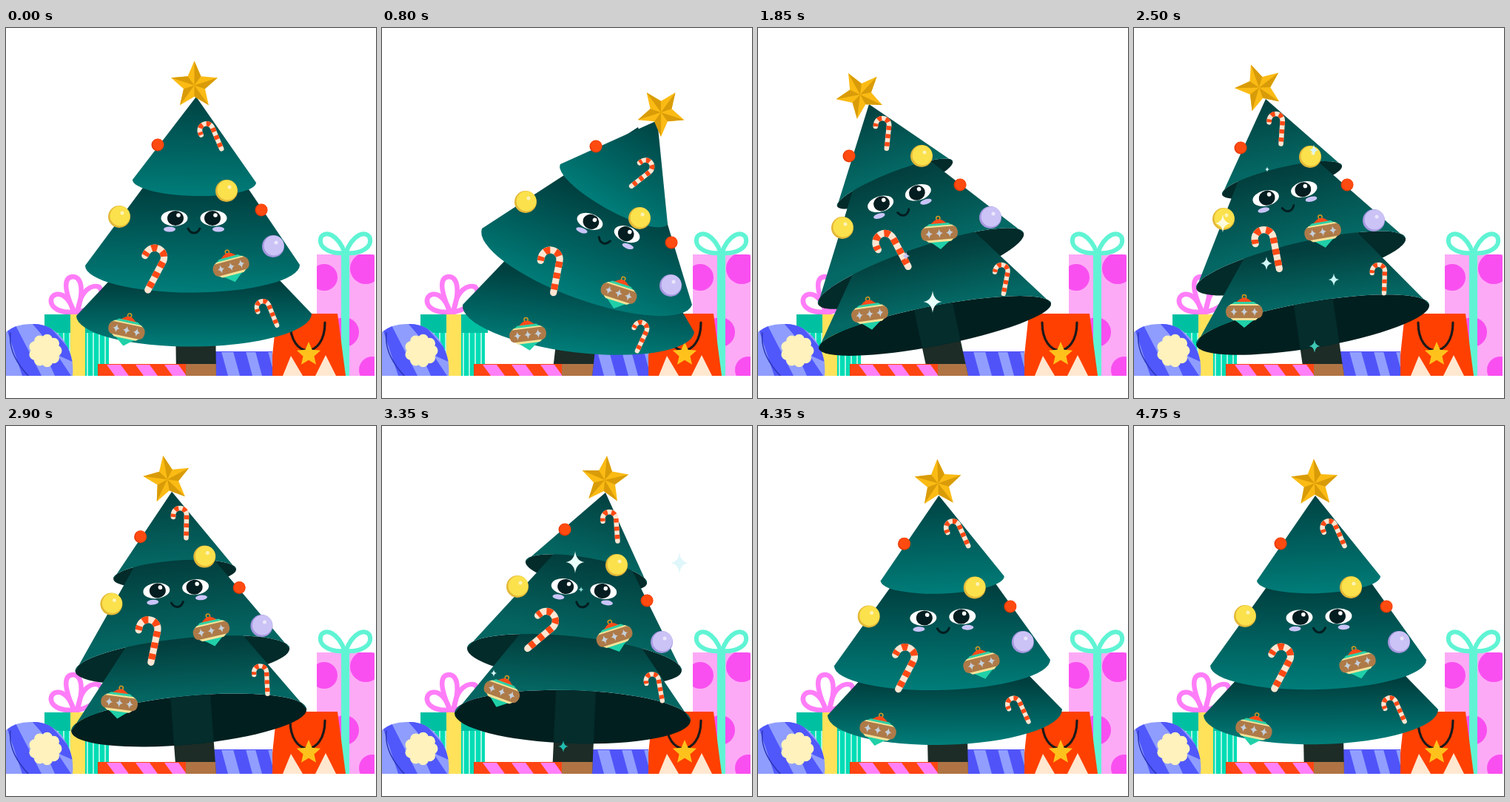
These frames come from a looping animation (500x500 px, 4.8 s). An HTML page with a canvas:

```html
<!DOCTYPE html>
<html lang="en">
<head>
<meta charset="utf-8">
<title>Swaying tree</title>
<style>
html, body { margin: 0; width: 100%; height: 100%; overflow: hidden; background: #fff; }
canvas { display: block; width: 500px; height: 500px; }
</style>
</head>
<body>
<canvas id="stage" width="500" height="500"></canvas>
<script>
const ctx = document.getElementById('stage').getContext('2d');
const LOOP = 4800, TAU = Math.PI * 2, RAD = Math.PI / 180;
const PIVOT = { x: 256, y: 455 };

// Each knot: time, pose a, pose b, mix from a to b.
const KNOTS = [
  [0, 0, 0, 0], [550, 0, 1, 1.04], [800, 1, 1, 0], [950, 1, 2, .37],
  [1050, 1, 2, .66], [1150, 1, 2, .9], [1400, 1, 2, 1.05], [1850, 2, 2, 0],
  [2200, 2, 3, .2], [2500, 3, 3, 0], [2750, 3, 4, .01], [3150, 3, 4, 1.05],
  [3350, 4, 4, 0], [3950, 5, 5, 0], [4430, 5, 6, 1.12], [4750, 6, 6, 0]
].map(([t, a, b, k]) => {
  const w = Array(7).fill(0);
  w[a] += 1 - k;
  w[b] += k;
  return { t, w };
});

function knot(i) {
  const n = KNOTS.length, turn = Math.floor(i / n), k = KNOTS[i - turn * n];
  return { t: k.t + turn * LOOP, w: k.w };
}

// Smooth blend weights of the seven poses.
function weightsAt(t) {
  let i = KNOTS.length - 1;
  while (KNOTS[i].t > t) i--;
  const [a, b, c, d] = [i - 1, i, i + 1, i + 2].map(knot);
  const h0 = b.t - a.t, h1 = c.t - b.t, h2 = d.t - c.t;
  const s = (t - b.t) / h1, s2 = s * s, s3 = s2 * s;
  return b.w.map((v, j) => {
    const d0 = (v - a.w[j]) / h0, d1 = (c.w[j] - v) / h1, d2 = (d.w[j] - c.w[j]) / h2;
    const m0 = (d0 * h1 + d1 * h0) / (h0 + h1), m1 = (d1 * h2 + d2 * h1) / (h1 + h2);
    return v * (2 * s3 - 3 * s2 + 1) + c.w[j] * (3 * s2 - 2 * s3)
      + h1 * (m0 * (s3 - 2 * s2 + s) + m1 * (s3 - s2));
  });
}

// Points blend as angle and radius round the foot of the tree; the rest are plain values.
function track(rows, points = 1) {
  const keys = rows.map(row => {
    const r = row.slice();
    for (let i = 0; i < points * 2; i += 2) {
      const dx = row[i] - PIVOT.x, dy = PIVOT.y - row[i + 1];
      r[i] = Math.atan2(dx, dy);
      r[i + 1] = Math.hypot(dx, dy);
    }
    return r;
  });
  return w => {
    const v = keys[0].map((_, c) => keys.reduce((sum, k, i) => sum + w[i] * k[c], 0));
    for (let i = 0; i < points * 2; i += 2) {
      const [a, r] = [v[i], v[i + 1]];
      v[i] = PIVOT.x + r * Math.sin(a);
      v[i + 1] = PIVOT.y - r * Math.cos(a);
    }
    return v;
  };
}

// Cone tiers: apex, left corner, right corner, signed rim depth.
const topTier = track([
  [257, 93, 171, 205, 338, 209, 20], [372, 125, 241, 184, 386, 265, 22],
  [150, 103, 107, 241, 263, 180, -16], [178, 96, 119, 225, 281, 186, -17],
  [302, 90, 194, 183, 358, 213, -20], [284, 88, 185, 181, 349, 208, -19],
  [245, 94, 166, 209, 333, 203, 20]], 3);
const midTier = track([
  [259, 116, 107, 321, 397, 320, 37], [346, 134, 135, 271, 419, 374, 45],
  [158, 122, 81, 373, 359, 277, -28], [176, 117, 84, 352, 367, 284, -28],
  [294, 106, 115, 300, 405, 331, -31], [279, 105, 110, 302, 401, 326, -31],
  [252, 116, 103, 324, 395, 316, 36]], 3);
const lowTier = track([
  [254, 220, 95, 389, 413, 386, 43], [290, 185, 109, 374, 422, 411, 46],
  [196, 185, 82, 433, 396, 372, -27], [216, 190, 84, 428, 399, 374, -31],
  [270, 180, 98, 388, 417, 398, -36], [264, 180, 97, 391, 415, 398, -37],
  [252, 220, 94, 391, 411, 383, 43]], 3);

const starTrack = track([[254.5, 77.5, 0], [377, 114, 36], [138, 90, -29], [169, 80.5, -19.5],
  [301, 73, 5], [285, 71, 11], [244, 77.5, -2]]);
// Last value: drop of the mouth.
const faceTrack = track([[254, 257, 0, 15], [306, 270, 19, 17], [191, 230, -17, 19],
  [204, 224, -13, 19], [273, 220, 7, 20], [264, 219.5, 5, 20], [250, 258, -2, 16]]);

const balls = [
  { r: 8.5, fill: '#ff4a10', shade: '#e53a06',
    at: track([[205, 158], [289, 160], [123, 173], [144, 162], [247, 140], [229, 137], [198, 159]]) },
  { r: 8.5, fill: '#ff4a10', shade: '#e53a06',
    at: track([[345, 246], [391, 290], [273, 212], [288, 212], [358, 236], [345, 237], [341, 244]]) },
  { r: 15, fill: '#fbe14c', shade: '#e3b838',
    at: track([[298, 220], [348, 257], [221, 173], [238, 174], [317, 188], [317, 182], [293, 218]]) },
  { r: 15, fill: '#fbe14c', shade: '#e3b838',
    at: track([[153, 255], [194, 235], [114, 270], [121, 258], [183, 217], [178, 230], [150, 257]]) },
  { r: 15, fill: '#cbc3f6', shade: '#a597df',
    at: track([[361, 295], [390, 348], [314, 256], [324, 260], [378, 292], [368, 291], [358, 292]]) }
];
const canes = [
  { size: 1, at: track([[276, 148, -23], [348, 195, 52], [168, 142, 6], [192, 136, 4],
    [309, 136, -4], [284, 129, 32], [269, 147, -24]]) },
  { size: 1.4, at: track([[195, 324, 28], [226, 328, 11], [180, 303, -28], [180, 300, -11],
    [211, 274, 50], [219, 287, 14], [193, 325, 28]]) },
  { size: .95, at: track([[352, 387, -22], [346, 416, 25], [328, 339, 11], [331, 339, 2],
    [368, 354, -10], [355, 349, 27], [351, 385, -24]]) }
];
const baubles = [
  track([[304, 322, -15], [320, 358, 18], [245, 277, -5], [255, 275, -10],
    [314, 284, -18], [297, 286, 0], [302, 320, -14]]),
  track([[163, 408, 12], [197, 414, -7], [151, 386, -8], [149, 383, 0],
    [162, 359, 20], [166, 363, -2], [162, 410, 12]])
];
// x, y, radius, peak time, half life, colour
const sparkles = [
  [236, 370, 15, 1850, 300, '#e8fffa'], [200, 308, 9, 1720, 260, '#c9c4f2'],
  [243, 165, 9, 2320, 480, '#d8f5f5'], [120, 264, 12, 2500, 300, '#fffbe0'],
  [179, 318, 9, 2470, 300, '#d5f7f7'], [270, 340, 9, 2560, 320, '#c8f5f5'],
  [244, 430, 9, 2550, 320, '#3fc6b4'], [180, 191, 4, 2450, 220, '#d8f5f5'],
  [261, 184, 15, 3350, 320, '#e8fffa'], [402, 185, 14, 3330, 320, '#dff6fa'],
  [245, 433, 8, 3350, 320, '#20bcb0'], [151, 334, 5, 3320, 260, '#d8f5f5'],
  [269, 221, 4, 3380, 220, '#8fe0d8']
];

function poly(points, fill) {
  ctx.beginPath();
  for (let i = 0; i < points.length; i += 2) ctx.lineTo(points[i], points[i + 1]);
  ctx.closePath();
  ctx.fillStyle = fill;
  ctx.fill();
}
function rect(x, y, w, h, fill) {
  ctx.fillStyle = fill;
  ctx.fillRect(x, y, w, h);
}
function oval(x, y, rx, ry, fill, turn = 0) {
  ctx.beginPath();
  ctx.ellipse(x, y, rx, ry, turn, 0, TAU);
  ctx.fillStyle = fill;
  ctx.fill();
}
function shape(d, fill) {
  ctx.fillStyle = fill;
  ctx.fill(new Path2D(d));
}
function line(d, color, width) {
  ctx.strokeStyle = color;
  ctx.lineWidth = width;
  ctx.lineCap = ctx.lineJoin = 'round';
  ctx.stroke(new Path2D(d));
}
function placed(x, y, deg, size, draw) {
  ctx.save();
  ctx.translate(x, y);
  ctx.rotate(deg * RAD);
  ctx.scale(size, size);
  draw();
  ctx.restore();
}
function clipped(path, draw) {
  ctx.save();
  ctx.clip(path);
  draw();
  ctx.restore();
}
function mixColor(a, b, k) {
  return `rgb(${a.map((v, i) => Math.round(v + (b[i] - v) * k)).join()})`;
}
function slantBands(xs, y, w, slant, fill) {
  for (const x of xs) poly([x, y, x + w, y, x + w + slant, 470, x + slant, 470], fill);
}

function fiveStar(x, y, r, deg, light, dark) {
  placed(x, y, deg, r, () => {
    const tip = (a, q) => [q * Math.sin(a), -q * Math.cos(a)];
    const outline = [];
    for (let i = 0; i < 10; i++) outline.push(...tip(i * TAU / 10, i % 2 ? .46 : 1));
    poly(outline, light);
    if (!dark) return;
    for (let i = 0; i < 5; i++) {
      const a = i * TAU / 5;
      poly([0, 0, ...tip(a, 1), ...tip(a + TAU / 10, .46)], dark);
    }
  });
}

function twinkle(x, y, r, fill) {
  placed(x, y, 0, r, () => shape('M0-1Q.1-.1 .85 0Q.1 .1 0 1Q-.1 .1-.85 0Q-.1-.1 0-1Z', fill));
}

function roundBox() {
  const body = new Path2D('M0 411Q14 399 36 400Q58 399 75 418Q93 442 90 470H0Z');
  clipped(body, () => {
    rect(0, 395, 95, 80, '#8f9dff');
    poly([0, 404, 12, 400, 48, 470, 22, 470], '#5058fb');
    poly([34, 398, 56, 400, 84, 432, 92, 452, 74, 444], '#5058fb');
    poly([58, 452, 72, 446, 88, 470, 66, 470], '#5058fb');
    line('M6 412Q2 442 34 474', '#2a35b8', 1.5);
  });
  for (let i = 0; i < 9; i++) {
    const a = i * TAU / 9;
    oval(53 + 15 * Math.cos(a), 436 + 15 * Math.sin(a), 7.5, 7.5, '#fff2bd');
  }
  oval(53, 436, 16, 16, '#fff2bd');
}

function tealBox() {
  line('M92 384C56 386 56 362 68 360C80 358 88 372 92 384', '#ff7df8', 6.5);
  line('M92 384C74 344 82 336 91 336C102 337 106 354 96 384', '#ff7df8', 6.5);
  line('M97 384C100 352 118 346 126 350C134 358 124 378 97 384', '#ff7df8', 6.5);
  rect(57, 412, 82, 58, '#00dcb5');
  for (let x = 61; x < 139; x += 8) rect(x, 412, 2, 58, '#a5f3e0');
  rect(52, 387, 91, 25, '#00c0a2');
  rect(87, 387, 20, 83, '#ffe25a');
}

function pinkBox() {
  rect(420, 306, 78, 164, '#fdaaf6');
  const face = new Path2D('M420 306H498V470H420Z');
  clipped(face, () => {
    for (const [x, y, r] of [[430, 337, 18], [486, 325, 21], [457, 411, 20], [495, 462, 18]])
      oval(x, y, r, r, '#f94ff0');
  });
  rect(453, 303, 11, 167, '#60f4d4');
  line('M458 304C448 278 432 274 426 282C420 296 438 306 458 304', '#60f4d4', 6);
  line('M459 304C469 278 485 274 491 282C497 296 479 306 459 304', '#60f4d4', 6);
}

function bag() {
  poly([366, 386, 448, 386, 459, 470, 357, 470], '#ff4000');
  poly([374, 470, 385, 443, 401, 470], '#ffe7d0');
  poly([418, 470, 432, 442, 446, 470], '#ffe7d0');
  line('M384 398C384 448 431 448 431 398', '#1c1a1a', 3.2);
  fiveStar(409, 441, 17, 0, '#ffc21c');
}

function blueBox() {
  const front = new Path2D('M268 437H360V470H268Z');
  clipped(front, () => {
    rect(268, 437, 92, 33, '#919eff');
    slantBands([274, 307, 337], 437, 17, 9, '#5054f8');
    rect(268, 436, 92, 2, '#5054f8');
  });
}

function stripedBox() {
  const front = new Path2D('M124 454H243V470H124Z');
  clipped(front, () => {
    rect(124, 454, 119, 16, '#ff4512');
    slantBands([136, 175, 214], 455, 19, 11, '#ff80f8');
  });
}

function tierShape([ax, ay, lx, ly, rx, ry, depth]) {
  const cx = (lx + rx) / 2, cy = (ly + ry) / 2;
  const half = Math.hypot(rx - lx, ry - ly) / 2, turn = Math.atan2(ry - ly, rx - lx);
  const cone = new Path2D(), rim = new Path2D();
  cone.moveTo(ax, ay);
  cone.ellipse(cx, cy, half, Math.abs(depth), turn, 0, Math.PI, depth < 0);
  cone.closePath();
  rim.ellipse(cx, cy, half, Math.abs(depth), turn, 0, TAU);
  return { ax, ay, cone, rim, depth,
    ex: cx - Math.sin(turn) * depth, ey: cy + Math.cos(turn) * depth };
}

function paintCone(tier, from, front) {
  const { ax, ay, ex, ey } = tier;
  const g = ctx.createLinearGradient(ax + (ex - ax) * from, ay + (ey - ay) * from, ex, ey);
  g.addColorStop(0, mixColor([2, 62, 61], [0, 63, 63], front));
  g.addColorStop(1, mixColor([4, 101, 97], [0, 125, 121], front));
  ctx.fillStyle = g;
  ctx.fill(tier.cone);
}

function trunk(low) {
  const footX = 257, slope = (low.ax - footX) / (470 - low.ay);
  const edge = (y, side) => footX + slope * (470 - y) + side * 27;
  const quad = (y0, y1, fill) =>
    poly([edge(y0, -1), y0, edge(y0, 1), y0, edge(y1, 1), y1, edge(y1, -1), y1], fill);
  quad(400, 470, '#1d2c26');
  quad(454, 470, '#b07444');
  if (low.depth < 0) {
    ctx.fillStyle = '#021f1f';
    ctx.fill(low.rim);
    clipped(low.rim, () => quad(300, 470, '#042d2c'));
  }
}

function ball({ r, fill, shade, at }, w) {
  const [x, y] = at(w);
  oval(x, y, r, r, shade);
  oval(x + r * .07, y - r * .07, r * .9, r * .9, fill);
  if (r > 10) oval(x + 4, y - 5, 2.5, 2.5, 'rgba(255,255,255,.6)');
}

function cane({ size, at }, w) {
  const [x, y, deg] = at(w);
  placed(x, y, deg, size, () => {
    const d = 'M8 20V-11A9 9 0 0 0-10-11V-8';
    line(d, '#ffe6d2', 6.6);
    ctx.setLineDash([5.5, 5.5]);
    ctx.lineDashOffset = -3;
    ctx.lineCap = 'butt';
    ctx.strokeStyle = '#ff4914';
    ctx.stroke(new Path2D(d));
  });
}

function bauble(at, w) {
  const [x, y, deg] = at(w);
  placed(x, y, deg, 1, () => {
    ctx.beginPath();
    ctx.arc(0, -20, 2.6, 0, TAU);
    ctx.strokeStyle = '#d99a20';
    ctx.lineWidth = 1.5;
    ctx.stroke();
    shape('M-9-14Q0-23 9-14L23-5H-23Z', '#ff4a18');
    shape('M-13-13H13L24-5H-24Z', '#2fd0a4');
    shape('M-18-10H18L22-7H-22Z', '#f3e39a');
    shape('M-21 7H21Q10 13 0 22Q-10 13-21 7Z', '#20d0a8');
    shape('M-20 8H20L15 12H-15Z', '#f3e39a');
    shape('M-20-8H20Q25-6 25 0Q25 7 20 9H-20Q-25 7-25 0Q-25-6-20-8Z', '#ae7a48');
    for (const sx of [-14, 0, 14]) twinkle(sx, .5, 6, '#c5d0dc');
  });
}

function face(w) {
  const [x, y, deg, drop] = faceTrack(w);
  placed(x, y, deg, 1, () => {
    for (const side of [-1, 1]) {
      oval(side * 26.5, 0, 18, 10.5, '#fff');
      oval(side * 25, 0, 11, 10, '#031d20');
      oval(side * 25 + 4, -4, 2.8, 2.8, '#fff');
      oval(side * 33, 15, 8, 3.4, '#c9c4f7');
    }
    line(`M-8 ${drop - 1}Q-5 ${drop + 5} 0 ${drop + 5}Q5 ${drop + 5} 8 ${drop - 1}`, '#031d20', 3);
  });
}

function draw(t) {
  const w = weightsAt(t);
  rect(0, 0, 500, 500, '#fff');
  ctx.save();
  ctx.beginPath();
  ctx.rect(0, 0, 499, 470);
  ctx.clip();

  tealBox();
  roundBox();
  pinkBox();
  bag();
  blueBox();

  const tiers = [topTier, midTier, lowTier].map(tier => tierShape(tier(w)));
  const front = Math.min(1, Math.max(0, (tiers[2].depth + 36) / 79));
  trunk(tiers[2]);
  for (const tier of tiers.slice(0, 2)) {
    if (tier.depth >= 0) continue;
    ctx.fillStyle = '#022b2a';
    ctx.fill(tier.rim);
  }
  paintCone(tiers[2], .6, front);
  paintCone(tiers[1], .42, front);
  paintCone(tiers[0], -.05, front);

  const [sx, sy, turn] = starTrack(w);
  fiveStar(sx, sy, 33, turn, '#fbbb14', '#d99c08');
  face(w);
  balls.forEach(b => ball(b, w));
  canes.forEach(c => cane(c, w));
  baubles.forEach(b => bauble(b, w));
  stripedBox();

  for (const [x, y, r, peak, life, fill] of sparkles) {
    const k = 1 - Math.abs(t - peak) / life;
    if (k > 0) twinkle(x, y, r * Math.sin(k * Math.PI / 2), fill);
  }
  ctx.restore();
}

const start = performance.now();
function frame() {
  const t = (performance.now() - start) % LOOP;
  draw(Math.floor(t / 50) * 50);
  requestAnimationFrame(frame);
}
frame();
</script>
</body>
</html>
```
